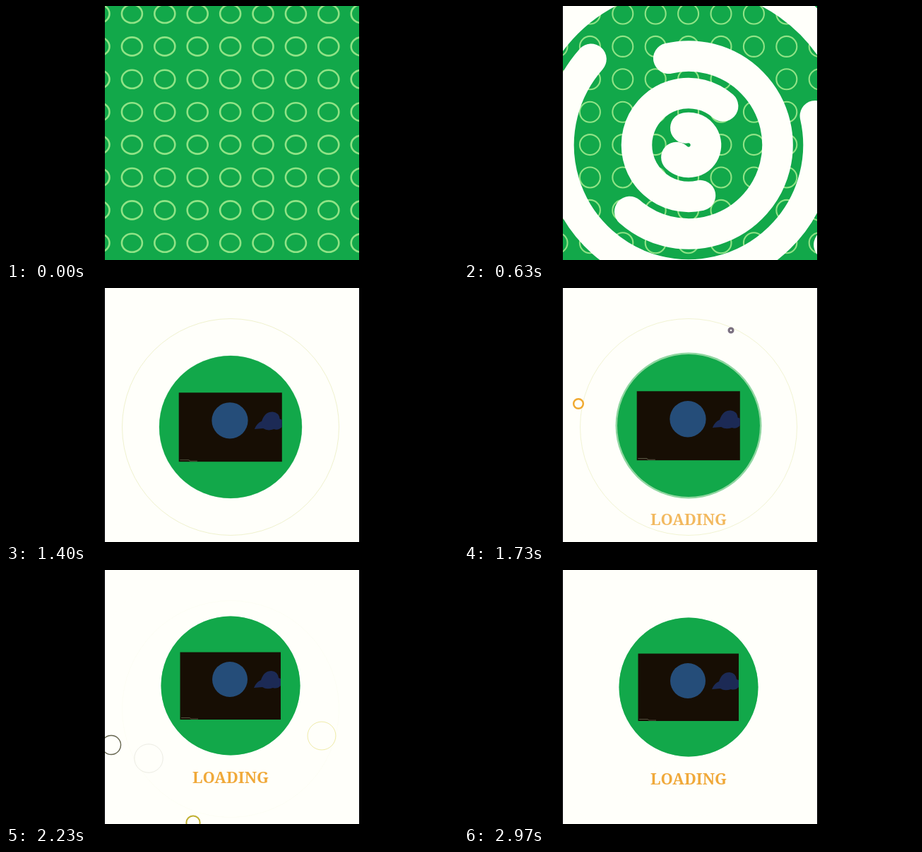
An HTML page that plays this animation: 640x360 px, repeating every 3010 ms.

```html
<!DOCTYPE html>
<html lang="en">
<head>
<meta charset="utf-8">
<title>Loading</title>
<style>
  html, body { margin: 0; width: 100%; height: 100%; overflow: hidden; background: #000; }
  svg { display: block; width: 100vw; height: 100vh; }
  text { font: 700 22px "Noto Serif", "Liberation Serif", serif; fill: #f0a93a; text-anchor: middle; }
</style>
</head>
<body>
<svg viewBox="0 0 640 360">
  <clipPath id="square"><rect x="140" width="360" height="360"/></clipPath>
  <rect width="640" height="360" fill="#000"/>
  <g clip-path="url(#square)">
    <rect x="140" width="360" height="360" fill="#12a84a"/>
    <g id="dots" fill="none" stroke="#90e386"></g>
    <g id="arcs" fill="none" stroke="#fffffa" stroke-linecap="round"></g>
    <circle id="trace" cx="318" cy="197" r="153.5" fill="none" stroke="#e6e9b4" stroke-width=".8"/>
    <g id="bubbles" fill="none"></g>
    <circle id="halo" cx="318" fill="#8fd6a0"/>
    <g id="badge">
      <circle r="98.5" fill="#12a84a"/>
      <g id="picture">
        <rect x="-71.5" y="-47.5" width="142.5" height="95.5" fill="#170e04"/>
        <circle cx="-1" cy="-9" r="25" fill="#254d79"/>
        <path d="M33 3 Q36 -5 43 -8 Q47 -21 58 -21 Q67 -20 68 -11 L71 -10 V0 Q66 5 60 3 Q51 6 45 2 Z" fill="#1c2a55"/>
        <path d="M-70 45.5 H-58 L-56 47 H-46" fill="none" stroke="#55513f"/>
      </g>
    </g>
    <text id="label" x="318">LOADING</text>
  </g>
</svg>
<script>
const LOOP = 3010, CX = 318, CY = 197;
const $ = id => document.getElementById(id);

function add(parent, tag, attrs = {}) {
  const el = document.createElementNS("http://www.w3.org/2000/svg", tag);
  set(el, attrs);
  return parent.appendChild(el);
}
function set(el, attrs) {
  for (const name in attrs) el.setAttribute(name, attrs[name]);
}

// Smooth interpolation through [time, value] keys without overshooting them.
function track(t, keys) {
  const last = keys.length - 1;
  if (t <= keys[0][0]) return keys[0][1];
  if (t >= keys[last][0]) return keys[last][1];
  const slope = i => (keys[i + 1][1] - keys[i][1]) / (keys[i + 1][0] - keys[i][0]);
  const tangent = i => {
    if (i === 0 || i === last) return 0;
    const a = slope(i - 1), b = slope(i);
    return a * b > 0 ? 2 * a * b / (a + b) : 0;
  };
  const i = keys.findIndex(k => k[0] > t) - 1;
  const [t0, v0] = keys[i], [t1, v1] = keys[i + 1];
  const d = t1 - t0, p = (t - t0) / d, q = 1 - p;
  return v0 * q * q * (1 + 2 * p) + v1 * p * p * (3 - 2 * p)
    + d * p * q * (tangent(i) * q - tangent(i + 1) * p);
}

const SWEEP = [[120, 0], [370, 67], [630, 234], [1070, 342], [1300, 359.9]];
const TURN = [[120, -14], [370, 0], [630, 20], [1070, 37], [1300, 42]];
const SEAL = [[1070, 0], [1350, 5]];
const RADIUS = [[1000, 0], [1070, 18.5], [1280, 82], [1480, 106], [1730, 101], [1900, 98.5]];
const CENTER = [[1600, 197], [1730, 195], [1950, 170], [2120, 163], [2230, 164], [2500, 166]];
const LABEL_GAP = [[1600, 150], [1730, 141], [1900, 137.5]];

const dots = [];
for (let row = 0; row < 8; row++)
  for (let col = 0; col < 9; col++)
    dots.push(add($("dots"), "ellipse", { cx: 132 + col * 46.4, cy: 11 + row * 46.4, rx: 14.5 }));

// Each ring thickens from "thin" to "full" while its arc closes.
const arcs = [
  { r: 24.5, start: -120, thin: 23.5, full: 49 },
  { r: 73.5, start: 57, thin: 31, full: 49 },
  { r: 126, start: -123, thin: 25.5, full: 54.6 },
  { r: 184, start: -33, thin: 27, full: 57.5 },
  { r: 244, start: 141, thin: 26, full: 58 }
].map(a => ({ ...a, el: add($("arcs"), "path") }));

const bubbles = [
  { x: 162, y: 164, start: 1632, color: "#f0a92f" },
  { x: 378, y: 60, start: 1691, color: "#7a7080" },
  { x: 202, y: 267, start: 1755, color: "#b9b9a8" },
  { x: 447, y: 235, start: 1780, color: "#d8cc30" },
  { x: 149, y: 248, start: 2005, color: "#66664f" },
  { x: 265, y: 358, start: 2085, color: "#c0b030" }
].map(b => ({ ...b, el: add($("bubbles"), "circle", { cx: b.x, cy: b.y, stroke: b.color }) }));

function point(r, degrees) {
  const a = degrees * Math.PI / 180;
  return `${CX + r * Math.cos(a)} ${CY + r * Math.sin(a)}`;
}

function drawArc({ el, r, start, thin, full }, t) {
  const sweep = track(t, SWEEP), from = start + track(t, TURN);
  const width = track(t, [[110, 0], [370, thin], [630, 43.5], [1070, full]]);
  set(el, {
    d: sweep > 0 ? `M${point(r, from)}A${r} ${r} 0 ${+(sweep > 180)} 1 ${point(r, from + sweep)}` : "",
    "stroke-width": width + track(t, SEAL)
  });
}

function drawBubble({ el, start }, t) {
  const p = (t - start) / 540;
  const visible = p > 0 && p < 1;
  const q = visible ? 1 - p : 1;
  set(el, {
    r: 20.5 * (1 - q * q),
    "stroke-width": 0.8 + 3 * q ** 3,
    opacity: visible ? Math.min(1, 3 * q) : 0
  });
}

function draw(t) {
  const ry = track(t, [[0, 13], [120, 14.5]]);
  for (const dot of dots) dot.setAttribute("ry", ry);
  $("dots").setAttribute("stroke-width", track(t, [[0, 2.6], [120, 2.1]]));
  for (const arc of arcs) drawArc(arc, t);
  for (const bubble of bubbles) drawBubble(bubble, t);
  set($("trace"), { opacity: track(t, [[1100, 0], [1300, 0.8], [1750, 0.7], [2400, 0]]) });

  const r = track(t, RADIUS), cy = track(t, CENTER);
  set($("badge"), { transform: `translate(${CX} ${cy}) scale(${r / 98.5})` });
  set($("picture"), { opacity: track(t, [[1120, 0], [1350, 1]]) });
  set($("halo"), { cy, r: r + track(t, [[1350, 0], [1600, 3], [1730, 2.5], [1900, 0]]) });
  set($("label"), {
    y: cy + track(t, LABEL_GAP),
    opacity: track(t, [[1600, 0], [1730, 0.8], [1850, 1]])
  });
}

const began = performance.now();
function tick() {
  draw((performance.now() - began) % LOOP);
  requestAnimationFrame(tick);
}
tick();
</script>
</body>
</html>
```
